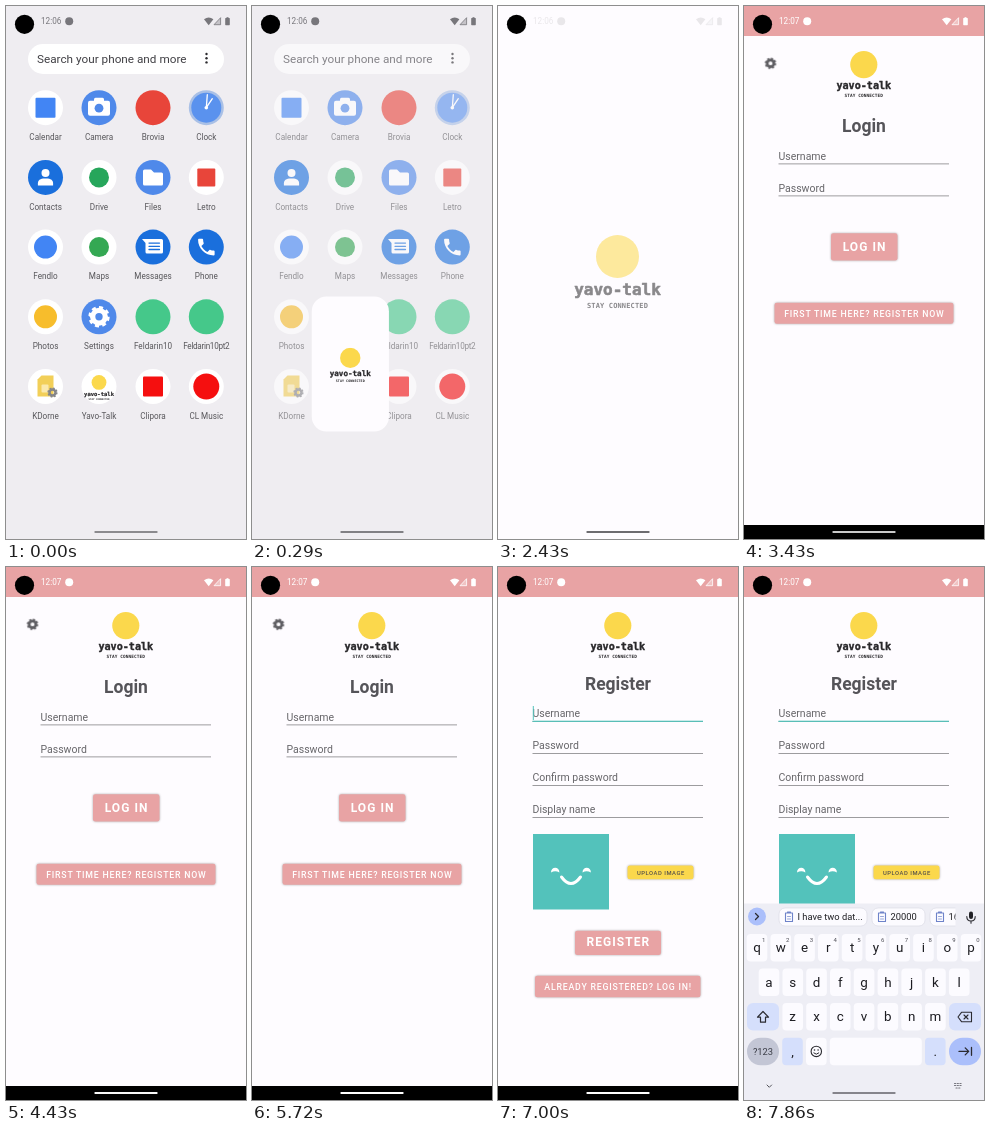
Write an HTML page that moves like this. It is 240 px wide and 533 px high and loops after 8000 ms.

```html
<!DOCTYPE html>
<html lang="en">
<head>
<meta charset="utf-8">
<title>Chat app sign-up</title>
<style>
  html, body { margin: 0; width: 100%; height: 100%; overflow: hidden; background: #efedf1; }
  svg { display: block; width: 240px; height: 533px; font-family: Roboto, sans-serif; }
  .mid { text-anchor: middle; }
  .line { fill: none; stroke: currentColor; stroke-linecap: round; stroke-linejoin: round; }
  .label { font-size: 8.17px; fill: #58575b; text-anchor: middle; }
  .word { font: bold 16px "DejaVu Sans Mono", monospace; text-anchor: middle; fill: #29282b; stroke: #29282b; stroke-width: .6px; stroke-linejoin: round; }
  .tag { font: bold 7px "DejaVu Sans Mono", monospace; letter-spacing: .15px; text-anchor: middle; fill: #29282b; }
  .title { font-size: 17.5px; font-weight: 700; fill: #555459; text-anchor: middle; }
  .hint { font-size: 10.5px; fill: #67666a; }
  .button { filter: drop-shadow(0 .8px .8px #0005); }
  .caps { font-weight: 500; letter-spacing: .0893em; text-anchor: middle; fill: #fff; }
  .key { font-size: 13.4px; fill: #1c1c21; text-anchor: middle; }
  .num { font-size: 6px; fill: #4a4a52; text-anchor: middle; }
  .chip { font-size: 9.33px; fill: #1f1f24; }

  /* Keyframes run on --now, set by the script at the recording's frame rate. */
  .anim { animation: 8s linear var(--now, 0s) infinite paused; }
  #home { animation-name: home; }
  #window { animation-name: grow; }
  #splash { animation-name: splash; }
  #page { animation-name: page; }
  #login { animation-name: login; }
  #register { animation-name: register; }
  #press { animation-name: press; animation-timing-function: step-end; }
  #focus { animation-name: focus; animation-timing-function: step-end; }
  #caret { animation-name: caret; animation-timing-function: step-end; }
  #keyboard { animation-name: keyboard; }
  #chips { animation-name: chips; }
  #status { animation-name: status; }
  #pill { animation-name: pill; }
  #before { animation-name: before; animation-timing-function: step-end; }
  #after { animation-name: after; animation-timing-function: step-end; }

  @keyframes home { 0%, 2% { opacity: 1 } 6%, 100% { opacity: 0 } }
  @keyframes grow {
    0%, 1.9% { x: 74.5px; y: 362px; width: 37px; height: 37px; rx: 18.5px; opacity: 0; animation-timing-function: step-end }
    2% { x: 74.5px; y: 362px; width: 37px; height: 37px; rx: 18.5px; opacity: 1; animation-timing-function: ease-in-out }
    7.1%, 100% { x: 0px; y: 0px; width: 240px; height: 533px; rx: 0px; opacity: 1 }
  }
  @keyframes splash {
    0%, 1.9% { transform: translate(93px, 369.5px) scale(.345); opacity: 0; animation-timing-function: step-end }
    2% { transform: translate(93px, 369.5px) scale(.345); opacity: 1; animation-timing-function: ease-in-out }
    7.1%, 30% { transform: translate(119.5px, 229px) scale(1); opacity: 1 }
    30.35% { opacity: .55 }
    31.5%, 100% { transform: translate(119.5px, 229px) scale(1); opacity: 0 }
  }
  @keyframes page { 0%, 30.5% { opacity: 0 } 33%, 100% { opacity: 1 } }
  @keyframes login { 0%, 74% { opacity: 1 } 76.5%, 100% { opacity: 0 } }
  @keyframes register { 0%, 74% { opacity: 0 } 76.5%, 100% { opacity: 1 } }
  @keyframes press { 0% { opacity: 0 } 73% { opacity: .18 } 77%, 100% { opacity: 0 } }
  @keyframes focus { 0% { opacity: 0 } 85.7%, 100% { opacity: 1 } }
  @keyframes caret { 0% { opacity: 0 } 85.7% { opacity: 1 } 92.8%, 100% { opacity: 0 } }
  @keyframes keyboard {
    0%, 90.8% { transform: translateY(197px); animation-timing-function: cubic-bezier(.2, .3, .2, 1) }
    95.5%, 100% { transform: none }
  }
  @keyframes chips { 0%, 95% { opacity: 0 } 96.4%, 100% { opacity: 1 } }
  @keyframes status {
    0%, 30% { color: #77767b }
    30.35% { color: #e9e7ea }
    32%, 100% { color: #fff }
  }
  @keyframes pill {
    0%, 1.9% { fill: #8b8a8e }
    7%, 30.4% { fill: #6d6c70 }
    33%, 43% { fill: #c9c9c9 }
    57%, 91% { fill: #fff }
    94%, 100% { fill: #85848b }
  }
  @keyframes before { 0% { opacity: 1 } 32%, 100% { opacity: 0 } }
  @keyframes after { 0% { opacity: 0 } 32%, 100% { opacity: 1 } }
</style>
</head>
<body>
<svg id="stage" viewBox="0 0 240 533"></svg>
<script>
const PINK = '#e8a3a4', TEAL = '#53c2bb', YELLOW = '#fbd84c', BLUE = '#1a6fdc', SKY = '#4f89ea';

const text = (x, y, s, cls, extra = '') => `<text x="${x}" y="${y}" class="${cls}" ${extra}>${s}</text>`;
const box = (x, y, w, h, fill, rx = 0, extra = '') =>
  `<rect x="${x}" y="${y}" width="${w}" height="${h}" rx="${rx}" fill="${fill}" ${extra}/>`;
const dot = (x, y, r, fill) => `<circle cx="${x}" cy="${y}" r="${r}" fill="${fill}"/>`;
const line = (d, w = 1.2, extra = '') => `<path class="line" d="${d}" stroke-width="${w}" ${extra}/>`;
const group = (id, body, extra = '') => `<g id="${id}" class="anim" ${extra}>${body}</g>`;
const at = (x, y, scale, body) => `<g transform="translate(${x} ${y}) scale(${scale})">${body}</g>`;

const gear = color => `<g fill="none" stroke="${color}"><circle r="6" stroke-width="5"/>
  <circle r="8.8" stroke-width="2.8" pathLength="16" stroke-dasharray="1.1 .9"/></g>`;

const logo = dot(0, 21.5, 21.5, YELLOW) + text(0, 60, 'yavo-talk', 'word') + text(0, 72.5, 'STAY CONNECTED', 'tag');

// Home screen glyphs, centred on the icon plate
const disc = (color, r) => dot(0, 0, r, color);
const square = (color, s) => box(-s / 2, -s / 2, s, s, color, 1);
const glyphs = {
  camera: box(-11, -7, 22, 15, '#fff', 2) + box(-5, -10, 10, 5, '#fff', 1.5) + dot(0, .5, 4.4, SKY),
  clock: dot(0, 0, 15, '#5a92ee') + line('M0 0L6-9M0 0L1-13', 1.3, 'color="#fff"') + dot(0, 0, 1.8, '#fff'),
  person: dot(0, -4.3, 4, '#fff') + '<path d="M-7.600 8V6C-7.600 1.500-3 1.200 0 1.200S7.600 1.500 7.600 6V8Z" fill="#fff"/>',
  folder: '<path d="M-10-6.500Q-10-8-8.500-8H-2L1-5H8.500Q10-5 10-3.500V6.500Q10 8 8.500 8H-8.500Q-10 8-10 6.500Z" fill="#fff"/>',
  bubble: '<path d="M-11-8H8.500Q10-8 10-6.500V5Q10 6.500 8.500 6.500H-6Q-7.500 6.500-7.500 5V-4Z" fill="#fff"/>' +
    line('M-4-4H6.500M-4-.8H6.500M-4 2.400H6.500', 1.3, `color="${BLUE}"`),
  phone: '<path transform="translate(-11 -11) scale(.92)" fill="#fff" d="M6.600 10.800c1.400 2.800 3.800 5.100 6.600 6.600l2.200-2.200c.3-.3.7-.4 1-.2 1.100.4 2.300.6 3.600.6.6 0 1 .4 1 1V20c0 .6-.4 1-1 1C10.600 21 3 13.400 3 4c0-.6.4-1 1-1h3.500c.6 0 1 .4 1 1 0 1.300.2 2.500.6 3.600.1.3 0 .7-.2 1z"/>',
  gear: at(0, 0, 1.05, gear('#fff')),
  card: '<path d="M-8-7L-4-11H8V10H-8Z" fill="#f2cf58"/>' + box(-4, -2, 7, 8, '#fbe9ad', 1) + at(7, 6, .5, gear('#85868a')),
  logo: at(0, -11.5, .345, logo),
};
const apps = [
  ['Calendar', '#fff', square('#4285f4', 20)], ['Camera', SKY, glyphs.camera],
  ['Brovia', '#e8453a', ''], ['Clock', '#a9c0e6', glyphs.clock],
  ['Contacts', BLUE, glyphs.person], ['Drive', '#fff', disc('#26a65b', 10)],
  ['Files', SKY, glyphs.folder], ['Letro', '#fff', square('#e8453a', 18)],
  ['Fendlo', '#fff', disc('#4285f4', 11.5)], ['Maps', '#fff', disc('#34a853', 10)],
  ['Messages', BLUE, glyphs.bubble], ['Phone', BLUE, glyphs.phone],
  ['Photos', '#fff', disc('#f7bd2c', 11.5)], ['Settings', SKY, glyphs.gear],
  ['Feldarin10', '#45c88a', ''], ['Feldarin10pt2', '#45c88a', '', 'letter-spacing="-.3"'],
  ['KDorne', '#fff', glyphs.card], ['Yavo-Talk', '#fff', glyphs.logo],
  ['Clipora', '#fff', square('#f50f0f', 20)], ['CL Music', '#fff', disc('#f50f0f', 13)],
];
const appIcon = ([name, plate, glyph, extra], i) => at([39.5, 93, 147, 200.3][i % 4], 101.7 + 69.7 * (i / 4 | 0), 1,
  dot(0, 0, 17.5, plate) + glyph + text(0, 32.3, name, 'label', extra));

const home = box(22, 38, 196, 30, '#fff', 15) +
  text(31, 57, 'Search your phone and more', '', 'font-size="11.75" fill="#414045"') +
  [48, 52.2, 56.4].map(y => dot(200.5, y, 1.2, '#2b2a2e')).join('') +
  apps.map(appIcon).join('');

const button = (x, y, w, h, label, size, base, fill = PINK, extra = '') =>
  box(x, y, w, h, fill, 2.3, 'class="button"') +
  text(x + w / 2 + .4, base, label, 'caps', `font-size="${size}" ${extra}`);
const field = (label, y) => text(34.5, y, label, 'hint') + box(34.5, y + 4, 170.5, .8, '#858488');

const login = at(26.5, 57.3, .56, gear('#5f5e63')) +
  text(120, 126, 'Login', 'title') +
  field('Username', 153.5) + field('Password', 185.5) +
  button(87, 227.3, 66.5, 27.2, 'LOG IN', 12, 245.4, PINK, 'style="font-weight:700"') +
  button(30.5, 296.8, 179, 21, 'FIRST TIME HERE? REGISTER NOW', 8.75, 310.7) +
  box(30.5, 296.8, 179, 21, '#fff', 2.3, 'id="press" class="anim"');

const avatar = box(35, 267, 76, 75.5, TEAL) +
  [57, 88.5].map(x => `<path d="M${x - 4} 305.500a4.200 4.800 0 0 1 8.400 0q-4.200-2.600-8.400 0z" fill="#fff"/>`).join('') +
  line('M63.500 310Q73 323 82.500 310', 3, 'color="#fff"');

const register = text(120, 122.5, 'Register', 'title') +
  ['Username', 'Password', 'Confirm password', 'Display name'].map((s, i) => field(s, 150 + 32 * i)).join('') +
  box(34.5, 153.7, 170.5, 1.2, TEAL, 0, 'id="focus" class="anim"') +
  box(34.8, 139, 1, 14, TEAL, 0, 'id="caret" class="anim"') + avatar +
  button(129.5, 298.5, 66, 13.8, 'UPLOAD IMAGE', 5.83, 307.5, YELLOW, 'style="fill:#55504a"') +
  button(77, 363.7, 86, 24.3, 'REGISTER', 12, 379.3, PINK, 'style="font-weight:700"') +
  button(37, 408.7, 165.5, 21.5, 'ALREADY REGISTERED? LOG IN!', 8.75, 422.7);

const page = box(0, 0, 240, 533, '#fefcff') + box(0, 0, 240, 30, PINK) + box(0, 519, 240, 14, '#000') +
  at(119.8, 45, .632, logo) + group('login', login) + group('register', register);

// Keyboard
const PITCH = 23.78, KEY = '#fcfbff', TINT = '#d5dffc', ACCENT = '#abbffb';
const keyBox = (x, y, w, fill = KEY, rx = 4) => box(x, y, w, 27.5, fill, rx);
const keyRow = (letters, x0, y, nums = '') => [...letters].map((c, i) => {
  const x = x0 + PITCH * i;
  return keyBox(x - 10.3, y, 20.6) + text(x, y + 18, c, 'key') +
    (nums ? text(x + 6.8, y + 7.5, nums[i], 'num') : '');
}).join('');
const clip = x => line(`M${x} 346h7v8.500h-7zM${x + 2} 345h3`, 1.1, 'color="#6e83c9"') +
  line(`M${x + 2} 349.500h3M${x + 2} 352h3`, .7, 'color="#6e83c9"');
const chip = (x, w, s) => box(x, 341, w, 18, '#fcfbff', 6, 'stroke="#dcdce6" stroke-width=".7"') +
  clip(x + 6.5) + text(x + 18.5, 353.2, s, 'chip');

const chips = chip(35, 88, 'I have two dat...') + chip(128, 53, '20000') + chip(186, 50, '16') +
  box(211.5, 337, 28.5, 26, '#eeeef5') +
  dot(13, 349.5, 9, ACCENT) + line('M11.500 346.500l3 3-3 3', 1.3) +
  box(225, 344.5, 4, 7.5, '#1f1f24', 2) + line('M222.800 349.500q0 4.500 4.200 4.500t4.200-4.500M227 354v2.300', 1.1);

const keyboard = box(0, 336.5, 240, 200, '#eeeef5') + group('chips', chips) +
  keyRow('qwertyuiop', 13, 367, '1234567890') + keyRow('asdfghjkl', 25, 401.5) + keyRow('zxcvbnm', 48.7, 436) +
  keyBox(3, 436, 32, TINT, 6) + line('M19 444.500l5.500 5.700h-3v5h-5v-5h-3z') +
  keyBox(205, 436, 32, TINT, 6) + line('M214 450l3.500-4.700h10v9.400h-10zM220 448l4 4m0-4l-4 4', 1.1) +
  keyBox(3, 470.7, 32, '#c3c6d5', 13.7) + text(19, 488, '?123', 'mid', 'font-size="9.33" fill="#3b3d47"') +
  keyBox(38.2, 470.7, 20.6, TINT) + text(48.5, 488.5, ',', 'key') +
  keyBox(62, 470.7, 20.6) + '<circle class="line" cx="72.300" cy="484.400" r="5.200" stroke-width="1.100"/>' +
  dot(70.5, 483, .8, '#2b2b31') + dot(74.1, 483, .8, '#2b2b31') + line('M69.800 486q2.500 2.600 5 0', 1) +
  keyBox(85.8, 470.7, 92) + keyBox(181, 470.7, 20.6, TINT) + text(191.3, 488.5, '.', 'key') +
  keyBox(205, 470.7, 32, ACCENT, 13.7) + line('M215 484.400h9.500m-3.300-3.500l3.500 3.500-3.500 3.500M227.500 480.500v7.800', 1.3) +
  line('M23 518l2.300 2.300 2.300-2.300', 1, 'color="#55555c"') +
  line('M210.500 516.500h8M210.500 518.500h8M212 521h5', 1.1, 'color="#77777f" stroke-dasharray="1.2 1.500"');

const status = ['before', 'after'].map((id, i) =>
    text(35, 18.4, `12:0${6 + i}`, 'anim', `id="${id}" font-size="8.17" fill="currentColor"`)).join('') +
  dot(63.2, 15.2, 4, 'currentColor') +
  '<path d="M198 13.300Q202.700 9.700 207.400 13.300L202.700 19.300Z" fill="currentColor"/>' +
  '<path d="M214.600 11.700V18.700H208Z" fill="currentColor" fill-opacity=".35" stroke="currentColor" stroke-width=".8"/>' +
  box(219.2, 12, 4.6, 7.2, 'currentColor', .6) + box(220.5, 11.2, 2, 1.5, 'currentColor');

document.getElementById('stage').innerHTML =
  box(0, 0, 240, 533, '#efedf1') + group('home', home) +
  '<rect id="window" class="anim" fill="#fefcff"/>' + group('splash', logo) +
  group('page', page) + group('keyboard', keyboard, 'color="#2b2b31"') +
  group('status', status) + dot(18.5, 18.3, 9.6, '#000') +
  box(88.3, 525, 63.4, 2.1, '#6d6c70', 1, 'id="pill" class="anim"');

const FPS = 7, LOOP = 8000, start = performance.now();
function tick() {
  const t = (performance.now() - start) % LOOP;
  const held = Math.floor(t * FPS / 1000) * 1000 / FPS;
  document.documentElement.style.setProperty('--now', `${-held}ms`);
  requestAnimationFrame(tick);
}
tick();
</script>
</body>
</html>
```
